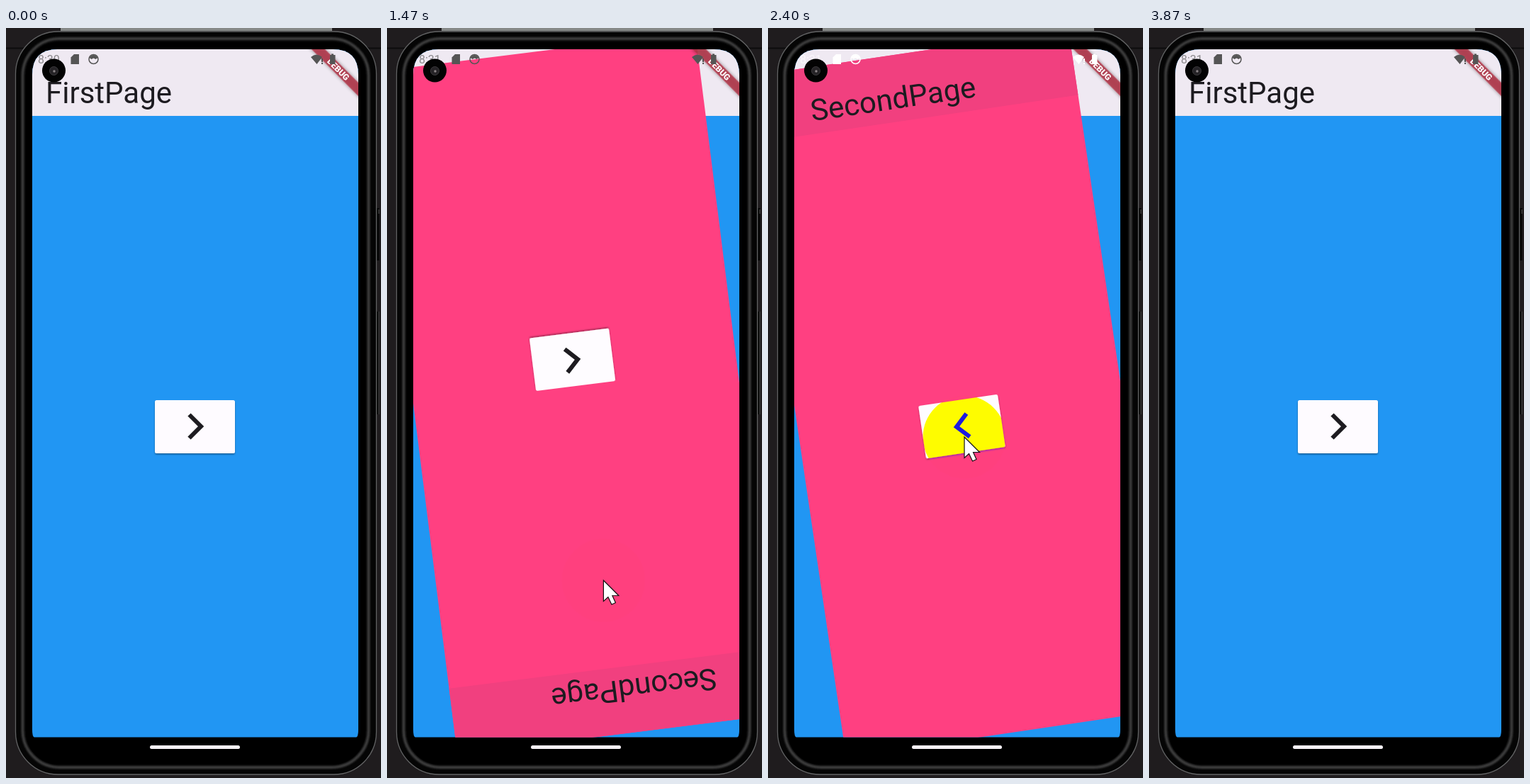
Recreate the animation shown at these times as an HTML page. Size 529 px wide and 1058 px high, loop 4140 ms.

```html
<!DOCTYPE html>
<html lang="en">
<head>
<meta charset="utf-8">
<title>Rotating page transition</title>
<style>
  html, body { margin: 0; width: 100%; height: 100%; overflow: hidden; background: #1f1c1e; }
  svg { display: block; width: 100vw; height: 100vh; font-family: Roboto, sans-serif; }
  .title { font-size: 42px; fill: #1d1b20; }
  .line { fill: none; stroke: #1d1b20; }
  #spot { mix-blend-mode: difference; fill: #00f; }
</style>
</head>
<body>
<svg viewBox="0 0 529 1058">
  <defs>
    <clipPath id="screen">
      <path d="M37 66Q37 30 73 30H461Q497 30 497 66V990Q497 1000 494 1000.5H40Q37 1000 37 990Z"/>
    </clipPath>
    <filter id="soft"><feGaussianBlur stdDeviation="1"/></filter>
    <filter id="shadow" x="-20%" y="-20%" width="140%" height="150%">
      <feDropShadow dx="0" dy="1.5" stdDeviation="1.3" flood-opacity=".4"/>
    </filter>
    <filter id="bannerShadow" x="-20%" y="-60%" width="140%" height="220%">
      <feDropShadow dx="0" dy="0" stdDeviation="2.5" flood-opacity=".5"/>
    </filter>
  </defs>

  <rect width="529" height="1058" fill="#1f1c1e"/>
  <path d="M0 28.5H529" stroke="#0d0c0d" stroke-width="2"/>
  <rect x="77" width="383" height="4" fill="#858887"/>

  <!-- Phone body and side buttons -->
  <path d="M524 254V328M524 400V545" stroke="#060606" stroke-width="5"/>
  <path d="M526 256V262M526 400V545" stroke="#555"/>
  <rect x="13.5" y="5" width="509" height="1048" rx="60" fill="#050505" stroke="#626364" stroke-width="1.300"/>
  <rect x="23.500" y="15" width="488" height="1028" rx="52" fill="none" stroke="#3c3c3d" stroke-width="4" filter="url(#soft)"/>
  <rect x="28" y="20" width="479" height="1019" rx="46" fill="#000"/>
  <rect x="203" y="1012" width="127" height="5" rx="2.5" fill="#f7f2f7"/>

  <g clip-path="url(#screen)">
    <rect x="37" y="30" width="460" height="971" fill="#2196f3"/>
    <rect x="37" y="30" width="460" height="94" fill="#efe9f2"/>
    <text class="title" x="56" y="105.500">FirstPage</text>
    <rect id="button1" x="210" y="525" width="113" height="75" rx="2.500" filter="url(#shadow)"/>
    <path class="line" d="M258.500 545.500L275 562L258.500 578.500" stroke-width="6"/>

    <g id="page2">
      <rect x="37" y="30" width="460" height="970" fill="#ff4081"/>
      <rect x="37" y="30" width="460" height="94" fill="#f1407f"/>
      <path class="line" d="M76 92H60M68 84L60 92L68 100" stroke-width="2.300"/>
      <text class="title" x="120.500" y="105.500">SecondPage</text>
      <rect id="button2" x="210" y="525" width="113" height="75" rx="2.500" filter="url(#shadow)"/>
      <path class="line" d="M275.500 545.500L259 562L275.500 578.500" stroke-width="6"/>
    </g>

    <g transform="translate(468.800 58.300) rotate(45)">
      <rect x="-60" y="-6.700" width="120" height="13.400" fill="#ae3347" fill-opacity=".85" filter="url(#bannerShadow)"/>
      <text y="4.200" text-anchor="middle" font-size="12" font-weight="900" fill="#fff">DEBUG</text>
    </g>

    <g id="status">
      <text id="clock" x="45" y="49.500" font-size="16" opacity=".65"></text>
      <path d="M96 37H103V51H91.500V41.500Z"/>
      <circle cx="123.500" cy="44" r="6.500" fill="none" stroke="currentColor" stroke-width="1.500"/>
      <path d="M117.500 42Q123.500 34 129.500 42L126.500 44L123.500 42.500L120.500 44Z"/>
      <path d="M430 41Q438 34 446 41L438.500 51ZM445 43H447V48H445ZM445 49H447V51H445Z"/>
      <path d="M457 38H459V36.500H462V38H464.500V51H457Z"/>
    </g>
  </g>

  <circle cx="67.500" cy="60" r="16.500" fill="#030303"/>
  <circle cx="67.500" cy="60.500" r="6" fill="#252326" stroke="#3c3a3d"/>
  <circle cx="68" cy="61" r="1.700" fill="#8b8587"/>

  <circle id="spot" r="58.500"/>
  <path id="cursor" d="M0 0V29.500L6.500 23.500L11.500 34L17 31.500L12.500 21.500H21.500Z" fill="#fff" stroke="#111" stroke-width="1.200"/>
</svg>

<script>
const LOOP = 4140;
const FORWARD = { start: 784, length: 2008 };
const BACK = { end: 3691, length: 1516 };
const SHOWN = { from: 910, to: 3690 };
const PRESS_1 = 720, PRESS_2 = 2440;

// Pointer path: time, x, y
const POINTER = [
  [70, 600, 770], [300, 440, 690], [560, 290, 590], [740, 286, 588],
  [870, 410.500, 888], [990, 470, 1000], [1200, 325, 881], [1670, 291, 704.500],
  [2250, 277, 577], [2560, 277, 577], [2900, 305, 770], [3200, 355, 1010],
  [3270, 367, 1052], [3420, 470, 1085], [3600, 620, 1130]
];

const $ = id => document.getElementById(id);
const clamp = v => Math.min(1, Math.max(0, v));
const mix = (a, b, k) => a + (b - a) * k;

// cubic-bezier(.4, 0, .2, 1)
function fastOutSlowIn(x) {
  let low = 0, high = 1;
  for (let i = 0; i < 24; i++) {
    const s = (low + high) / 2, r = 1 - s;
    if (1.2 * r * r * s + 0.6 * r * s * s + s ** 3 < x) low = s; else high = s;
  }
  return low * low * (3 - 2 * low);
}

function pointerAt(t) {
  const next = POINTER.findIndex(key => key[0] > t);
  if (next < 0) return POINTER.at(-1).slice(1);
  if (next === 0) return POINTER[0].slice(1);
  const a = POINTER[next - 1], b = POINTER[next];
  const k = (t - a[0]) / (b[0] - a[0]);
  return [mix(a[1], b[1], k), mix(a[2], b[2], k)];
}

function draw(t) {
  // The return begins wherever the forward turn was interrupted.
  const progress = Math.min((t - FORWARD.start) / FORWARD.length, (BACK.end - t) / BACK.length);
  const angle = 360 * fastOutSlowIn(clamp(progress));
  const shown = t >= SHOWN.from && t < SHOWN.to;
  $('page2').setAttribute('display', shown ? 'inline' : 'none');
  $('page2').setAttribute('transform', `rotate(${angle} 267 515)`);

  // Status icons turn white while the second page lies under them.
  const white = shown ? clamp((Math.cos(angle * Math.PI / 180) - 0.3) / 0.57) : 0;
  const grey = Math.round(mix(85, 255, white));
  $('status').style.color = $('status').style.fill = `rgb(${grey},${grey},${grey})`;
  $('clock').textContent = t < 1000 ? '8:30' : '8:31';

  $('button1').setAttribute('fill', t > PRESS_1 && t < 1500 ? '#ebe8ec' : '#fefbff');
  $('button2').setAttribute('fill', t > PRESS_2 ? '#eeebf0' : '#fefcff');

  const place = `translate(${pointerAt(t)})`;
  $('spot').setAttribute('transform', place);
  $('cursor').setAttribute('transform', place);
}

function tick() {
  draw(performance.now() % LOOP);
  requestAnimationFrame(tick);
}
tick();
</script>
</body>
</html>
```
